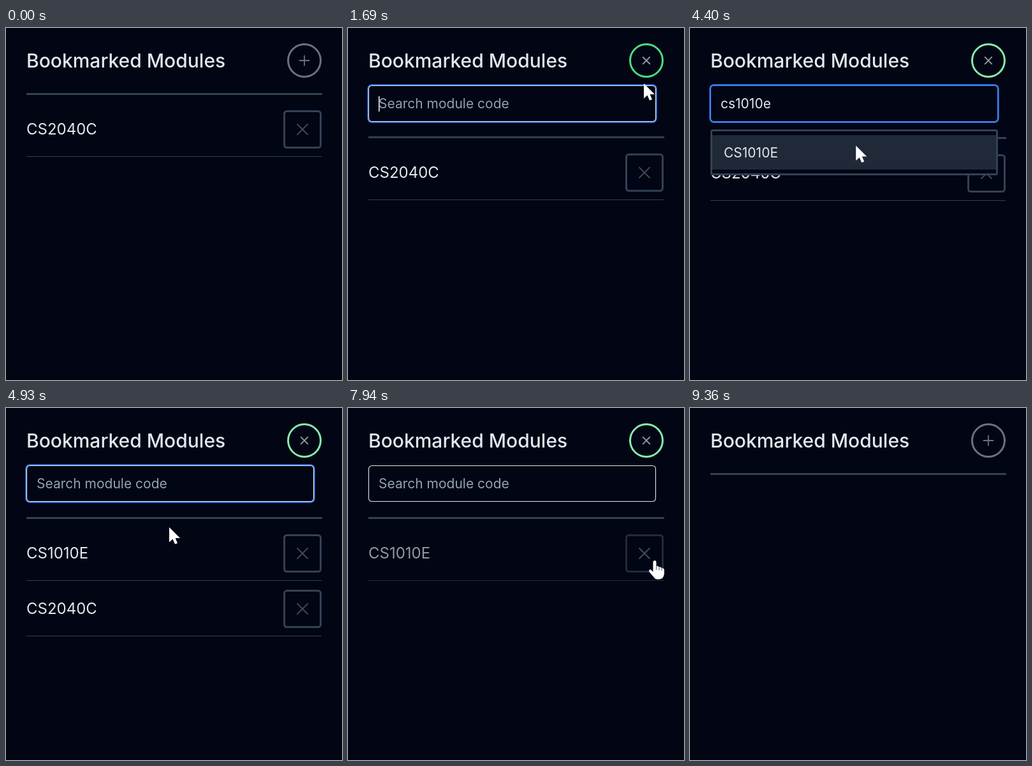
An HTML page with a canvas for the animation above (9940 ms loop, 527x552 px).

```html
<!DOCTYPE html>
<html lang="en">
<head>
<meta charset="utf-8">
<title>Bookmarked Modules</title>
<style>
html, body { margin: 0; width: 100%; height: 100%; overflow: hidden; background: #020514; }
canvas { display: block; }
</style>
</head>
<body>
<canvas id="stage" width="527" height="552"></canvas>
<script>
const ctx = document.getElementById('stage').getContext('2d');
const LOOP = 9940;
const BG = '#020514', TEXT = '#e2e8f0', MUTED = '#94a3b8', LINE = '#334155';
const GRAY = [107, 114, 128], ICON = [150, 158, 172];
const GREEN = [74, 222, 128], MINT = [134, 239, 172];
const WHITE = [226, 232, 240], BLUE = [59, 130, 246];

const OPEN = 1400, FOCUS = 1670, PICK = 4480, REFOCUS = 4940;
const REMOVE_OLD = 6600, REMOVE_NEW = 7830, CLOSE = 8620;

// [time, text in the field]
const TYPING = [
  [0, ''], [2530, 'c'], [2740, 'cs'], [2970, 'cs1'], [3110, 'cs10'],
  [3310, 'cs101'], [3430, 'cs1010'], [3540, 'cs1010e'], [PICK, '']
];
const C_CODES = ['CDE2000', 'CDE2212', 'CDE2300', 'CDE2310', 'CDE2501', 'CDE3301', 'CDE4301'];
const CS_CODES = [...['', 'A', 'E', 'J', 'R', 'S', 'X']].map(s => 'CS1010' + s);

// [time, x, y] of the pointer tip
const PATH = [
  [730, 503, 3], [1120, 469, 46], [1450, 468, 50], [1690, 464, 87], [1800, 463, 93],
  [4040, 463, 93], [4430, 257, 186], [4930, 256, 187], [5910, 256, 187],
  [6520, 471, 292], [6900, 472, 294], [7300, 505, 460], [7740, 481, 240],
  [7960, 481, 239], [8500, 470, 45], [8880, 468, 50], [9220, 527, 552]
];
const HAND_TIMES = [[1080, 1560], [6430, 6960], [7680, 8080], [8460, 8930]];

const clamp = v => Math.min(1, Math.max(0, v));
const ramp = (t, start, length) => clamp((t - start) / length);
const smooth = v => v * v * (3 - 2 * v);
const mix = (a, b, k) => `rgb(${a.map((v, i) => v + (b[i] - v) * k).join()})`;
const latest = (list, t) => list.filter(item => item[0] <= t).pop();

// Underdamped spring from 0 to 1
function spring(ms) {
  if (ms <= 0) return 0;
  const s = ms / 1000, decay = 8.9, freq = 7.8;
  return 1 - Math.exp(-decay * s) * (Math.cos(freq * s) + decay / freq * Math.sin(freq * s));
}

function text(str, x, y, size, color, weight = 400) {
  ctx.font = `${weight} ${size}px Inter, sans-serif`;
  ctx.fillStyle = color;
  ctx.fillText(str, x, y);
  return ctx.measureText(str).width;
}

function box(x, y, w, h, r, color, lineWidth) {
  ctx.beginPath();
  ctx.roundRect(x, y, w, h, r);
  ctx.strokeStyle = color;
  ctx.lineWidth = lineWidth;
  ctx.stroke();
}

function rect(x, y, w, h, color) {
  ctx.fillStyle = color;
  ctx.fillRect(x, y, w, h);
}

function plus(x, y, reach, angle, color, lineWidth) {
  ctx.save();
  ctx.translate(x, y);
  ctx.rotate(angle);
  ctx.strokeStyle = color;
  ctx.lineWidth = lineWidth;
  ctx.lineCap = 'round';
  ctx.stroke(new Path2D(`M${-reach} 0H${reach}M0 ${-reach}V${reach}`));
  ctx.restore();
}

function faded(alpha, draw) {
  if (alpha <= 0) return;
  ctx.save();
  ctx.globalAlpha = clamp(alpha);
  draw();
  ctx.restore();
}

function drawHeader(t, open) {
  text('Bookmarked Modules', 32, 62, 30, TEXT, 500);
  let ring;
  if (t < FOCUS) ring = mix(GRAY, GREEN, ramp(t, 1120, 200));
  else if (t < CLOSE) ring = mix(GREEN, MINT, ramp(t, 1690, 250));
  else ring = mix(MINT, GRAY, ramp(t, 8880, 200));
  ctx.beginPath();
  ctx.arc(468, 51, 25.5, 0, Math.PI * 2);
  ctx.strokeStyle = ring;
  ctx.lineWidth = 3;
  ctx.stroke();
  plus(468, 51, 7.5, open * Math.PI / 4, mix(GRAY, ICON, clamp(open)), 1.8);
}

function caretShown(t) {
  if (t < FOCUS || t >= REMOVE_OLD || (t >= PICK && t < REFOCUS)) return false;
  const start = t >= REFOCUS ? REFOCUS : Math.max(FOCUS, t < PICK ? latest(TYPING, t)[0] : 0);
  const period = start === FOCUS ? 560 : 500;
  return Math.floor((t - start) / period) % 2 === 0;
}

function drawInput(t, value) {
  const focused = t < REMOVE_OLD && !(t >= PICK && t < REFOCUS - 40);
  const since = t < PICK ? FOCUS + 30 : REFOCUS;
  const blue = focused ? ramp(t, since, 270) : 0;
  if (focused) box(31.2, 89.2, 452.6, 58.6, 6, mix(BLUE, BLUE, 0), 1.7);
  box(32.5, 90.5, 450, 56, 5, mix(WHITE, BLUE, blue), 1.1);
  let end = 0;
  if (value) end = text(value, 48, 126, 21, TEXT);
  else text('Search module code', 48, 126, 21, MUTED);
  if (caretShown(t)) rect(48 + end, 107, 1.5, 24, '#fff');
}

function drawRow(code, y, alpha, hovered) {
  faded(alpha, () => {
    text(code, 32, y + 8.4, 24, TEXT);
    box(436.5, y - 28.5, 57, 57, 4, LINE, 3);
    plus(465, y, 11.3, Math.PI / 4, hovered ? '#64748b' : '#3d4859', 2);
    rect(32, y + 42, 463, 1, LINE);
  });
}

function drawList(value) {
  if (!value) return;
  const codes = value === 'c' ? C_CODES : value.endsWith('e') ? ['CS1010E'] : CS_CODES;
  const height = codes.length > 1 ? 420 : 69;
  rect(32, 159, 451, height + 3, BG);
  box(33.5, 160.5, 448, height, 2, LINE, 3);
  rect(35, 168, 445, 54, '#1f2937');
  codes.forEach((code, i) => text(code, 53, 202.5 + 54 * i, 21, TEXT));
}

const ARROW = new Path2D('M0 0V23.5L5.5 18.5 9 26.5 13 25 9.6 17H17Z');
const HAND = new Path2D('M-2.5 2Q0 -2 2.5 2V9Q5 8 7 10.5Q9.5 9.5 11 12' +
  'Q14.5 11.5 15 14.5V21Q14.5 25 12 28Q7 31 1 29L-8.5 18Q-9.5 13.5 -6 14.5L-2.5 18Z');
const FINGERS = new Path2D('M2.7 9V15M7 10.5V15.5M11 12V16');

function drawPointer(t) {
  const i = PATH.findIndex(p => p[0] > t);
  if (i < 1) return;
  const [t0, x0, y0] = PATH[i - 1], [t1, x1, y1] = PATH[i];
  const k = smooth(ramp(t, t0, t1 - t0));
  ctx.save();
  ctx.translate(x0 + (x1 - x0) * k, y0 + (y1 - y0) * k);
  ctx.fillStyle = '#fff';
  if (HAND_TIMES.some(([from, to]) => t >= from && t < to)) {
    ctx.fill(HAND);
    ctx.strokeStyle = LINE;
    ctx.lineWidth = 0.9;
    ctx.stroke(FINGERS);
  } else {
    ctx.fill(ARROW);
  }
  ctx.restore();
}

function draw(t) {
  const open = spring(t - OPEN) - spring(t - CLOSE);
  const shift = 69 * open;
  const value = latest(TYPING, t)[1];
  rect(0, 0, 527, 552, BG);
  drawHeader(t, open);
  if (t >= OPEN) faded(open, () => drawInput(t, value));
  rect(32, 102 + shift, 464, 3, LINE);
  drawRow('CS1010E', 159 + shift, ramp(t, PICK, 250) - ramp(t, REMOVE_NEW, 310),
    t > 7680 && t < 8080);
  drawRow('CS2040C', 159 + shift + 85 * spring(t - PICK), 1 - ramp(t, REMOVE_OLD, 290),
    false);
  drawList(value);
  drawPointer(t);
}

const begin = performance.now();
function tick() {
  draw((performance.now() - begin) % LOOP);
  requestAnimationFrame(tick);
}
tick();
</script>
</body>
</html>
```
